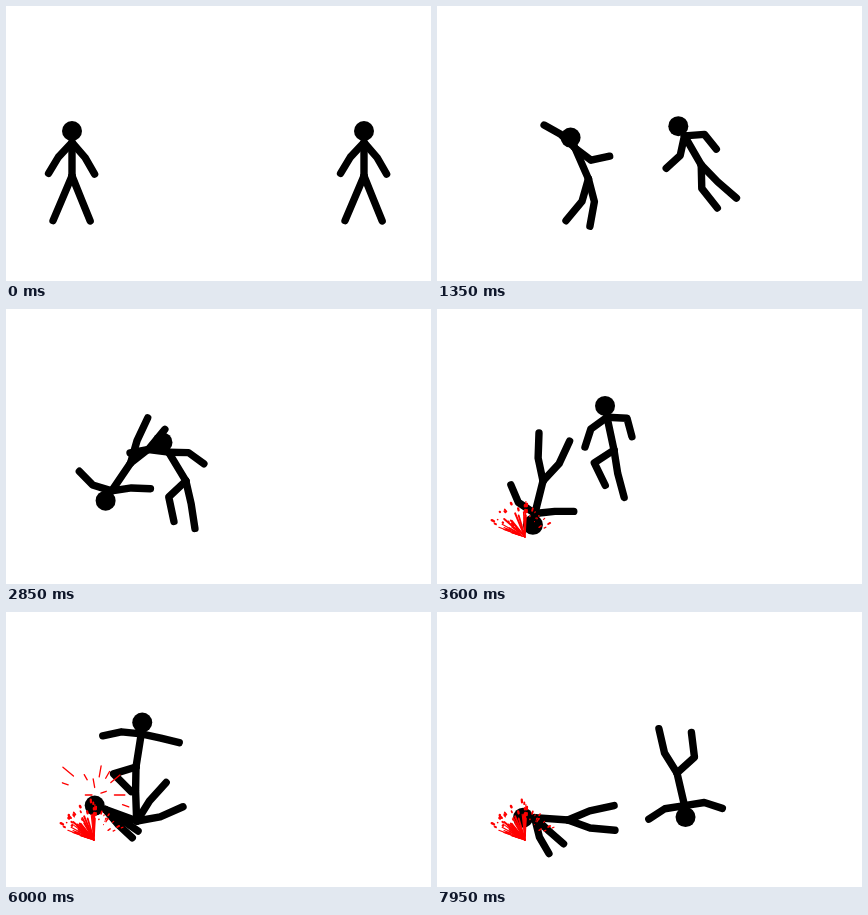
An HTML page with a canvas that plays this animation: 425 by 275 pixels, repeating every 8000 ms.

```html
<!DOCTYPE html>
<html lang="en">
<head>
<meta charset="utf-8">
<title>Stick fight</title>
<style>
html, body { margin: 0; height: 100%; overflow: hidden; background: #fff; }
canvas { display: block; }
</style>
</head>
<body>
<canvas id="stage" width="425" height="275"></canvas>
<script>
const ctx = document.getElementById('stage').getContext('2d');
const LOOP = 8000, STEP = 150, STRIDE = 375;
const TORSO = 33.5, NECK = 11.5, UPPER = 20, FORE = 19, THIGH = 23.5, SHIN = 25;
const cos = a => Math.cos(a * Math.PI / 180);
const sin = a => Math.sin(a * Math.PI / 180);

// Pose: hip point, then bone angles in degrees (0 right, 90 down):
// [torso, head], two arms [upper, fore, upper, fore], two legs [thigh, shin, thigh, shin]
const stand = [[66, 170], [-90, -90], [133, 121, 49, 60], [113, 113, 68, 68]];

const run = [[127, 172], [-69, -63], [165, 117, 69, 27], [102, 143, 82, 103]];
const grab = [[182, 174], [-169, -176], [297, 325, -3, -61], [111, 113, 67, 97]];
const leap = [[177, 141], [-102, -100], [144, 108, 3, 75], [147, 64, 81, 75]];
const tuck = [[177, 64], [-259, -333], [-160, -70, -197, -123], [-168, -254, -222, -124]];
const stomp = [[130, 155], [-441, -445], [-174, -192, -348, -346], [-197, -315, -269, -272]];
const handstand = [[240, 161], [-283, -275], [-9, 18, -189, -213], [-42, -97, -122, -103]];

const charge = [[302, 174], [-108, -117], [93, 151, 9, 81], [106, 52, 77, 57]];
const held = [[217, 140], [-135, -129], [114, 120, -21, 14], [67, 51, 7, 21]];
const slam = [[106, 172], [-256, -260], [214, 247, -6, 0], [-102, -88, -47, -65]];
const lie = [[131, 209], [-180, -180], [295, 323, 12, 12], [-48, -32, 8, -5]];
const hit = [[131, 209], [-160, -160], [410, 403, 32, 35], [-58, -48, -10, -24]];
const limp = [[131, 208], [-176, -180], [436, 420, 43, 41], [-23, -12, 20, 5]];

const shift = ([[x, y], ...bones], dx, dy) => [[x + dx, y + dy], ...bones];

// Key: time, pose, height of the arc flown to the next key
const hero = [[0, stand], [750, run], [2100, grab], [3150, shift(leap, 2, 30)], [3600, leap],
  [4200, shift(leap, 8, -52)], [4800, tuck], [5250, shift(stomp, 12, -52)], [5550, stomp],
  [6150, stomp, 25], [7200, shift(stomp, 55, 12)], [7950, handstand]];
const rival = [[0, shift(stand, 292, 0)], [750, charge], [2100, held, 25], [3000, slam],
  [3600, slam], [4200, lie], [5400, lie], [5700, hit], [6150, hit], [7950, limp]];

const mix = (a, b, k) => Array.isArray(a) ? a.map((v, i) => mix(v, b[i], k)) : a + (b - a) * k;

function poseAt(keys, t) {
  const next = keys.findIndex((key, i) => i && key[0] >= t);
  const [t0, from, lift = 0] = keys[next - 1], [t1, to] = keys[next];
  const k = (t - t0) / (t1 - t0);
  const [hip, spine, arms, legs] = shift(mix(from, to, k), 0, -lift * sin(180 * k));
  // running stride, arms against legs
  const swing = t < 3 * STRIDE ? 28 * sin(180 * t / STRIDE) : 0;
  const sway = (a, i) => i < 2 ? a - swing : a + swing;
  return [hip, spine, arms.map(sway), legs.map((a, i) => sway(a, 3 - i))];
}

function limb([x, y], ...bones) {
  ctx.beginPath();
  ctx.moveTo(x, y);
  for (const [angle, length] of bones) {
    x += length * cos(angle);
    y += length * sin(angle);
    ctx.lineTo(x, y);
  }
  ctx.stroke();
  return [x, y];
}

function figure([hip, [torso, head], arms, legs]) {
  ctx.strokeStyle = ctx.fillStyle = '#000';
  ctx.lineWidth = 7.4;
  const neck = limb(hip, [torso, TORSO]);
  for (const i of [0, 2]) {
    limb(neck, [arms[i], UPPER], [arms[i + 1], FORE]);
    limb(hip, [legs[i], THIGH], [legs[i + 1], SHIN]);
  }
  ctx.beginPath();
  ctx.arc(neck[0] + NECK * cos(head), neck[1] + NECK * sin(head), 10, 0, 7);
  ctx.fill();
}

function randomizer(seed) {
  return () => (seed = seed * 16807 % 2147483647) / 2147483647;
}

// A streak on the ray from a point, between two distances
function streak(x, y, angle, near, far, width) {
  ctx.lineWidth = width;
  limb([x + near * cos(angle), y + near * sin(angle)], [angle, far - near]);
}

// Fan of rays to the upper left, each with a drop beyond it, and specks on the right
function splash(rays) {
  const rnd = randomizer(77);
  for (let i = 0; i < rays; i++) {
    const angle = 198 + 75 * rnd(), reach = 12 + 16 * rnd(), gap = reach + 3 + 9 * rnd();
    streak(88, 228, angle, 8 * rnd(), reach, 1 + rnd());
    streak(88, 228, angle + 6 * rnd(), gap, gap + 3 * rnd(), 1 + 1.5 * rnd());
    if (i % 2) {
      const r = 12 + 20 * rnd();
      streak(88, 228, 275 + 70 * rnd(), r, r + 3 * rnd(), 1 + rnd());
    }
  }
}

// Thin drops flying out of the head
function spray(k) {
  const rnd = randomizer(9);
  for (let angle = 180; angle <= 380; angle += 20) {
    const r = k * (4 + 32 * rnd());
    streak(90, 183, angle, r, r + 5 + 9 * rnd(), 1.3);
  }
}

function blood(t) {
  if (t < 3150) return;
  ctx.strokeStyle = '#f00';
  splash(t < 5700 ? 22 : 30);
  if (t >= 5700 && t < 6600) spray((t - 5400) / 600);
}

function draw(now) {
  const t = Math.floor(now % LOOP / STEP) * STEP;
  ctx.fillStyle = '#fff';
  ctx.fillRect(0, 0, 425, 275);
  ctx.lineCap = ctx.lineJoin = 'round';
  figure(poseAt(rival, t));
  figure(poseAt(hero, t));
  blood(t);
}

const start = performance.now();
function tick() {
  draw(performance.now() - start);
  requestAnimationFrame(tick);
}
tick();
</script>
</body>
</html>
```
